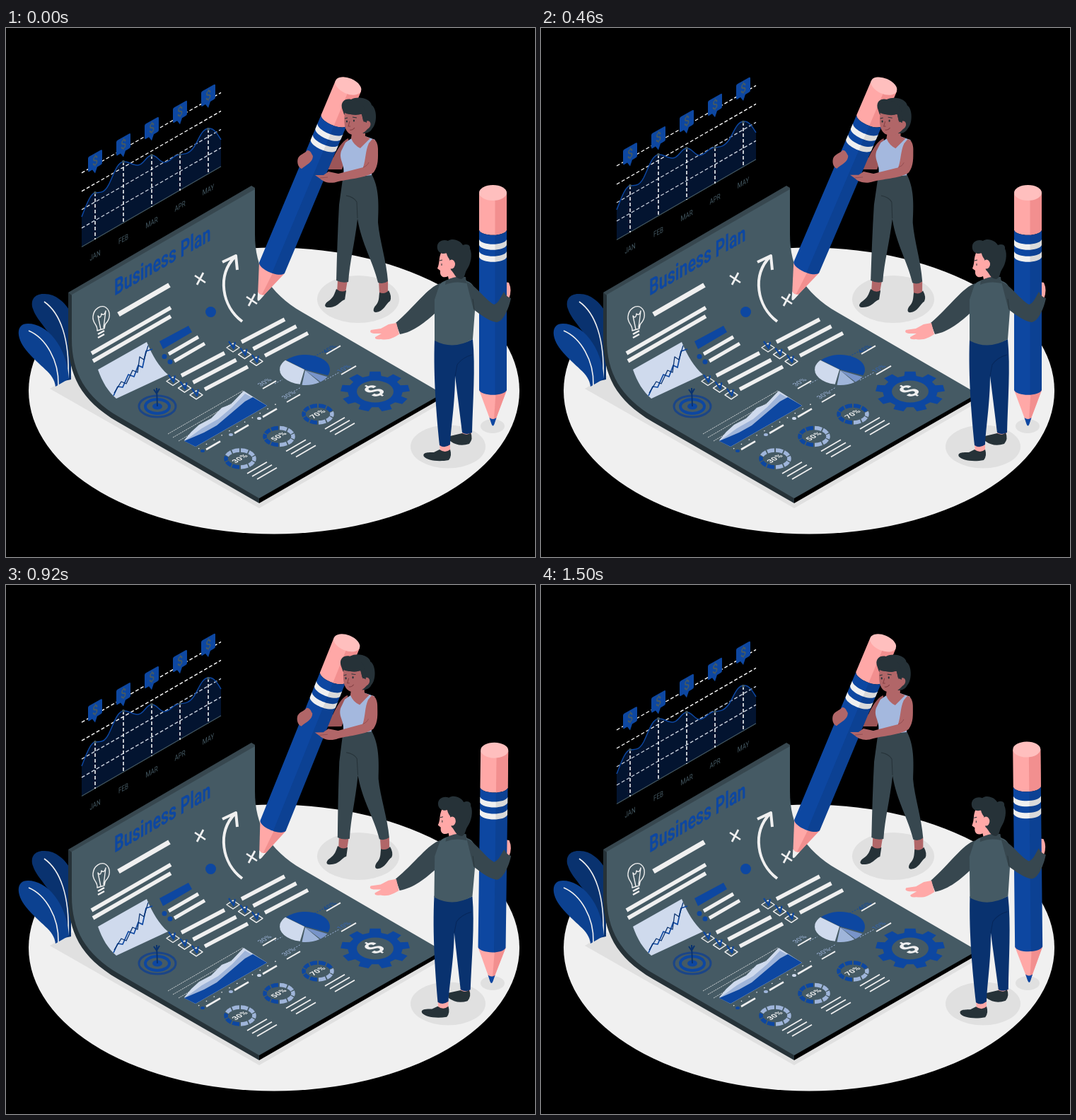
An HTML page with a canvas that plays this animation: 748 by 748 pixels, repeating every 1540 ms.

```html
<!DOCTYPE html>
<html lang="en">
<head>
<meta charset="utf-8">
<title>Business plan</title>
<style>
html, body { margin: 0; width: 100%; height: 100%; overflow: hidden; background: #000; }
canvas { display: block; width: 100vw; height: 100vh; }
</style>
</head>
<body>
<canvas id="stage" width="748" height="748"></canvas>
<script>
const ctx = document.getElementById('stage').getContext('2d');
const LOOP = 1540, SLOPE = 0.577;
const BLUE = '#0d47a1', NAVY = '#09326f', PALE = '#9fb5da', MIST = '#cfdaed',
      PAPER = '#455a64', SLATE = '#37474f', INK = '#263238',
      WHITE = '#f0f0f0', SHADE = '#e0e0e0', PINK = '#ffa8a7', ROSE = '#f28f8f', BROWN = '#b16668';
const WALL = [0.66, -0.381, 0, 1], FLOOR = [0.866, -0.5, 0.8, 0.46];

function fill(color, d) {
  ctx.fillStyle = color;
  ctx.fill(new Path2D(d));
}
function line(color, width, d, dash = []) {
  ctx.strokeStyle = color;
  ctx.lineWidth = width;
  ctx.setLineDash(dash);
  ctx.stroke(new Path2D(d));
  ctx.setLineDash([]);
}
function oval(color, x, y, rx, ry, width) {
  ctx.beginPath();
  ctx.ellipse(x, y, rx, ry, 0, 0, Math.PI * 2);
  ctx.fillStyle = ctx.strokeStyle = color;
  ctx.lineWidth = width || 1;
  width ? ctx.stroke() : ctx.fill();
}
function rising(color, width, x, y, run, dash) {
  line(color, width, `M${x},${y} l${run},${-run * SLOPE}`, dash);
}
function label(text, x, y, font, color, matrix, align = 'center') {
  ctx.save();
  ctx.transform(...matrix, x, y);
  ctx.font = font + ' Roboto, sans-serif';
  ctx.textAlign = align;
  ctx.textBaseline = align === 'left' ? 'alphabetic' : 'middle';
  ctx.fillStyle = color;
  ctx.fillText(text, 0, 0);
  ctx.restore();
}
function turned(x, y, degrees, draw) {
  ctx.save();
  ctx.translate(x, y);
  ctx.rotate(degrees * Math.PI / 180);
  ctx.translate(-x, -y);
  draw();
  ctx.restore();
}
function track(keys, t) {
  const i = keys.findIndex(k => k[0] > t);
  const [t0, a] = keys[i - 1], [t1, b] = keys[i];
  return a + (b - a) * (t - t0) / (t1 - t0);
}

function scenery() {
  oval(WHITE, 379, 513, 347, 202.5);
  oval(SHADE, 498, 383.5, 58, 33.5);
  oval(SHADE, 625, 592, 53, 30.5);
  oval(SHADE, 688, 563, 17, 10);
  fill(SHADE, 'M62,510 L94,491 L160,550 L358,668 L617,517 L618,529 L358,679Z');
  fill(NAVY, 'M92,497 V403 C84,388 70,376 55,376 C40,375 34,385 38,397 C44,416 66,430 74,460 L78,500Z');
  line(WHITE, 1.6, 'M54,387 C77,403 90,440 88,495');
  fill('#0c4190', 'M70,507 C68,487 48,480 28,455 C14,437 14,418 31,418 C58,418 86,450 89,496Z');
  line(WHITE, 1.6, 'M32,428 C56,438 75,470 74,505');
}

function sheet() {
  fill(INK, 'M88,374 L93,376 L160,540 L358,664 V672 L158,557 C105,526 88,490 88,440Z');
  fill('#000', 'M358,664 L617,516 V523 L358,672Z');
  fill(SLATE, 'M88,374 L347,223 L352,226 V236 L93,378Z');
  fill(PAPER, 'M93,377 L352,228 V292 C352,339 371,374 419,402 L617,517 L358,665 L160,550 C112,522 93,487 93,440Z');
}

function upperNotes() {
  label('Business Plan', 153, 379, 'bold 32.5px', BLUE, WALL, 'left');
  line(WHITE, 1.4, 'M129,428 C130,419 122,418 123,408 C124,397 134,391 141,395 C149,401 147,412 141,418 C139,421 140,423 139,425Z M134,426 L130,407 q4,5 5,-3 q4,4 6,-4 L138,424');
  line(WHITE, 2.5, 'M130,433 l9,-5 M130,438 l9,-5');
  rising(WHITE, 7, 159, 405, 72);
  rising(WHITE, 5.5, 121, 460, 112);
  rising(WHITE, 5.5, 123, 471, 110);
  for (const [x, y] of [[274, 355], [347, 385]])
    line(WHITE, 2.7, `M${x - 7},${y - 5} l15,10 M${x + 5},${y - 9} l-9,17`);
  line(WHITE, 4, 'M334,415 C305,393 298,350 324,323 M306,331 L325,322 L327,342');
  oval(BLUE, 289.5, 401.5, 7.5, 7.5);
  fill(MIST, 'M130,483 L199,444 C207,463 216,479 229,490 L156,524 C144,514 136,500 130,483Z');
  line(BLUE, 1.7, 'M152,520 L158,507 L165,508 L173,490 L181,493 L187,477 L193,480 L198,457 L207,454');
  line(NAVY, 1.3, 'M153,516 L163,500 L170,503 L179,484 L186,487 L189,465 L195,469 L201,449');
  fill(BLUE, 'M217,443 L258,421 L263,430 L222,454Z');
  oval(BLUE, 224, 464.5, 3.5, 3.5);
  oval(BLUE, 232, 472, 3.5, 3.5);
  rising(WHITE, 5, 230, 461, 42);
  rising(WHITE, 5, 238, 471, 43);
}

function checklist(x, y) {
  for (let i = 0; i < 3; i++, x += 16.5, y += 9.7) {
    line(WHITE, 5.5, `M${x + 12},${y - 8} l61,-32`);
    line(WHITE, 1.4, `M${x - 9},${y} l9,-6 l9,6 l-9,6Z`);
    line(BLUE, 2.2, `M${x - 6},${y - 9} L${x + 1},${y + 1} l2,-9`);
  }
}

function target() {
  oval('#1b4587', 214, 535, 26, 15, 3);
  oval(BLUE, 214, 535, 17, 10, 4);
  oval(BLUE, 214, 535, 7, 4.5);
  line(NAVY, 2, 'M214,535 L213,509 M209,511 L213,517 L217,510');
}

function areaChart() {
  [[229, 574], [236, 579], [244, 584]].forEach(([x, y]) => rising(WHITE, 0.8, x, y, 106, [2, 1]));
  fill(MIST, 'M252,583 L262,571 L273,561 L290,552 L305,537 L318,532 L336,513 L369,534 L268,592Z');
  fill(PALE, 'M252,584 L262,577 L277,566 L300,553 L320,536 L338,517 L369,534 L268,592Z');
  fill(BLUE, 'M252,584 L280,572 L298,562 L318,545 L338,528 L349,522 L369,534 L268,592Z');
  rising(WHITE, 1.4, 272, 595, 110, [1.5, 11]);
  [BLUE, PALE, MIST].forEach((color, i) => {
    const x = 278 + i * 40, y = 598 - i * 23;
    oval(color, x, y, 3, 2);
    rising(WHITE, 2.6, x + 5, y - 2, 20);
  });
}

function wedge(color, from, to, dx = 0, dy = 0) {
  ctx.beginPath();
  ctx.moveTo(423 + dx, 483 + dy);
  ctx.ellipse(423 + dx, 483 + dy, 35, 21, 0, from, to);
  ctx.closePath();
  ctx.fillStyle = color;
  ctx.fill();
}
function pie() {
  wedge(BLUE, -2.45, 0.4);
  wedge(MIST, 1.75, 3.83, -1, 0);
  wedge('#7894c9', 0.45, 0.9, 0, 1);
  wedge(PALE, 0.95, 1.7, 0, 1);
  line(BLUE, 1, 'M429,468 L448,458 h5', [2, 2]);
  line(PALE, 1, 'M451,498 L471,487 M380,503 L391,497 M407,514 L417,508', [2, 2]);
  label('40%', 458, 454, '10px', BLUE, FLOOR);
  label('10%', 478, 482, '10px', '#3465b5', FLOOR);
  label('30%', 366, 501, '10px', PALE, FLOOR);
  label('30%', 400, 519, '10px', PALE, FLOOR);
  rising(WHITE, 2, 453, 461, 20);
  rising(WHITE, 2, 474, 490, 21);
  rising(WHITE, 2, 363, 510, 19);
  rising(WHITE, 2, 397, 529, 19);
}

function gear() {
  ctx.beginPath();
  const teeth = 9, step = Math.PI * 2 / teeth;
  for (let i = 0; i < teeth; i++) {
    for (const [offset, size] of [[-0.32, 0.79], [-0.22, 1], [0.22, 1], [0.32, 0.79]]) {
      const a = (i + offset) * step - Math.PI / 2;
      ctx.lineTo(522 + Math.cos(a) * 49 * size, 514 + Math.sin(a) * 28.5 * size);
    }
  }
  ctx.fillStyle = BLUE;
  ctx.fill();
  oval(PAPER, 522, 514, 26, 15.5);
  label('$', 522, 514, 'bold 34px', WHITE, FLOOR);
}

function gauge(x, y, percent) {
  for (let i = 0; i < 10; i++) {
    const a = Math.PI / 2 + i * Math.PI / 5;
    ctx.beginPath();
    ctx.ellipse(x, y, 20, 12, 0, a + 0.05, a + Math.PI / 5 - 0.05);
    ctx.lineWidth = 5.5;
    ctx.strokeStyle = i < percent / 10 ? BLUE : PALE;
    ctx.stroke();
  }
  label(percent + '%', x, y, 'bold 11px', WHITE, FLOOR);
  for (let i = 0; i < 3; i++) rising(WHITE, 1.8, x + 10 + i * 7, y + 21 + i * 4, 28);
}

function floatingChart() {
  const hill = 'M107,267 C113,252 119,234 126,233 C133,232 138,235 145,222 C152,208 157,190 166,189 C173,188 178,194 186,194 C195,194 198,180 206,180 C214,180 217,190 224,190 C232,190 236,180 245,179 C254,178 259,178 266,168 C273,157 277,142 287,142 C294,142 298,148 304,158';
  fill('#031430', hill + ' V196 L107,309Z');
  for (let i = 0; i < 4; i++) rising(i < 2 ? '#fff' : '#ccd3df', 1.4, 107, 205 + i * 26, 197, [5, 3]);
  rising(PAPER, 1.2, 107, 309.5, 197);
  line(BLUE, 1.5, hill);
  const months = ['JAN', 'FEB', 'MAR', 'APR', 'MAY'], peaks = [233, 189, 180, 179, 143];
  months.forEach((month, i) => {
    const x = 126 + i * 40, y = 188.5 - i * 23.1;
    line('#fff', 1.5, `M${x},${peaks[i]} V${299 - i * 23}`, [5, 3]);
    oval(PAPER, x, peaks[i], 2, 2);
    label(month, x, 322 - i * 23.2, '11px', PAPER, [0.72, -0.41, 0, 1]);
    fill(BLUE, `M${x - 10},${y - 4} q0,-2 2,-3 l16,-9 q2,-1 2,1 v17 q0,2 -2,3 l-5,3 l-3,9 l-4,-5 l-5,3 q-1,0 -1,-2Z`);
    label('$', x, y, '500 18px', PAPER, [0.8, -0.42, 0, 1]);
  });
}

// A pencil hanging down from its cap, tilted by an angle in degrees.
function pencil(x, y, tilt, lead) {
  const band = (top, bottom, color) => fill(color,
    `M-19.5,${top} C-16,${top + 9} 16,${top + 9} 19.5,${top} V${bottom} C16,${bottom + 9} -16,${bottom + 9} -19.5,${bottom}Z`);
  ctx.save();
  ctx.translate(x, y);
  ctx.rotate(tilt * Math.PI / 180);
  fill(PINK, 'M-19.5,279 L-2,326 Q0,331 2,326 L19.5,279Z');
  fill(ROSE, 'M4,283 L1,328 L19.5,279Z');
  fill(lead, 'M-5,318 Q0,322 5,318 L2,327 Q0,332 -2,327Z');
  band(0, 53, PINK);
  fill(ROSE, 'M3,0 H19.5 V53 Q14,58 3,60Z');
  band(53, 279, BLUE);
  band(66, 74, WHITE);
  band(83, 91, WHITE);
  fill('rgba(0,0,0,.09)', 'M3,60 Q14,58 19.5,53 V279 Q14,285 3,286Z');
  oval('#ffbfbe', 0, 0, 19.5, 11);
  ctx.restore();
}

function woman() {
  fill('#9c5558', 'M484,156 C475,160 469,171 463,183 L430,190 L432,200 L475,200 L486,170Z');
  pencil(484, 82, 22.8, WHITE);
  fill(BROWN, 'M413,184 C416,178 422,178 426,173 C431,173 432,178 434,181 C434,190 425,193 418,199 C413,197 411,190 413,184Z');
  fill(BROWN, 'M469,356 H483 L480,374 H468Z M527,358 H540 V376 L528,377Z');
  fill(INK, 'M467,369 Q474,375 481,371 L479,384 C472,386 469,396 454,395 C449,394 451,389 456,386 C463,381 464,377 467,369Z');
  fill(INK, 'M528,374 Q536,377 541,371 Q546,380 543,386 C537,390 534,401 523,402 C518,402 519,396 523,392 C528,386 527,380 528,374Z');
  fill(SLATE, 'M477,207 L516,205 C528,225 527,250 526,275 C528,300 538,330 540,358 Q533,363 526,360 C519,330 503,306 497,270 C493,305 486,330 484,359 Q475,361 467,357 C468,320 469,285 471,250Z');
  line(INK, 1, 'M481,237 Q492,239 496,246 L497,269');
  fill('#a4b8de', 'M480,162 L490,155 L508,153 L522,158 L517,208 Q495,211 477,208 C480,192 470,187 474,174Z');
  fill(BROWN, 'M490,143 L508,140 V153 L515,156 L501,170 Q492,166 488,156Z');
  fill(INK, 'M475,113 C473,103 481,99 488,101 C500,95 516,101 517,109 C525,114 525,135 518,142 C515,148 509,149 505,149 L478,122Z');
  fill(BROWN, 'M479,120 C486,124 496,121 503,122 L506,133 C516,127 519,139 511,143 C508,147 499,154 490,151 C480,149 477,138 479,120Z');
  fill(INK, 'M475,109 C478,124 497,125 503,121 L505,131 L510,134 C513,120 506,105 492,102Z');
  oval(INK, 482, 132, 1.1, 1.6);
  oval(INK, 492, 131, 1.1, 1.6);
  line(INK, 1, 'M479,128 l4,-1 M490,126 l6,1');
  line('#843f43', 1, 'M486,132 l-2,7 l3,0 M486,144 q4,1 7,-3');
  fill(BROWN, 'M518,157 C523,157 526,164 526,171 C526,184 527,194 520,204 C509,212 487,213 470,217 C459,221 449,218 444,213 L437,208 L449,208 L456,203 L470,206 L505,197 C509,185 508,174 513,163Z');
  line('#8d484c', 0.8, 'M505,197 Q511,195 513,190 M444,212 L455,211');
}

function man() {
  fill(PINK, 'M701,364 Q704,358 711,360 Q716,371 711,383 L700,386Z');
  pencil(688.5, 233, 0, BLUE);
  fill(PINK, 'M613,586 H628 V602 H614Z M645,570 H658 V579 H645Z');
  fill(INK, 'M628,577 L645,573 Q653,577 657,572 Q661,581 655,588 Q640,593 628,584Z');
  fill(INK, 'M613,596 Q621,602 628,596 Q631,605 626,611 C610,614 595,611 591,606 C588,600 597,600 605,600Z');
  fill(NAVY, 'M606,440 Q632,454 660,440 C664,480 660,530 659,572 Q651,576 645,572 L635,492 C635,530 629,565 628,589 Q620,595 613,590 C609,550 604,495 606,440Z');
  line('#07275a', 1, 'M635,492 L638,476 Q645,466 659,462');
  fill(SLATE, 'M614,361 C597,366 578,394 551,417 L557,433 C576,430 594,415 608,402Z');
  fill(PINK, 'M552,417 L541,419 L530,425 L516,427 Q513,431 520,432 L531,432 L522,437 Q521,441 530,440 C541,442 548,438 556,433Z');
  fill(PAPER, 'M613,363 C617,355 646,350 652,358 C665,361 667,382 663,400 L660,440 Q632,456 606,442 V384Z');
  fill(PINK, 'M616,316 C611,326 614,331 610,340 L614,343 C613,352 619,354 625,351 L627,360 Q638,360 642,352 L641,325Z');
  fill(SLATE, 'M622,357 Q636,350 650,352 L651,361 Q635,357 621,363Z');
  fill(INK, 'M610,312 C608,302 618,298 625,301 C632,296 643,301 646,307 C653,304 657,308 656,312 C660,320 657,334 652,341 C648,347 650,352 644,355 C635,355 634,346 629,342 L627,327 C624,323 623,320 623,318 C617,321 611,317 610,312Z');
  oval(PINK, 630, 334, 5, 6.5);
  line(INK, 1, 'M613,329 l4,-1 M616,333 v3');
  fill(SLATE, 'M651,359 C665,364 676,383 690,391 C697,389 700,379 704,373 Q708,381 714,382 C711,397 703,415 694,416 C683,415 671,405 661,398Z');
  line(INK, 0.8, 'M662,398 L660,383');
}

function draw(t) {
  ctx.clearRect(0, 0, 748, 748);
  ctx.lineJoin = 'round';
  scenery();
  sheet();
  upperNotes();
  checklist(236, 499.5);
  checklist(321, 452);
  target();
  areaChart();
  pie();
  gear();
  gauge(331, 609, 30);
  gauge(386, 577.5, 50);
  gauge(441, 546, 70);

  const lift = track([[0, 0], [170, -4], [460, -10], [630, -13], [740, -13.2], [920, -11], [1080, -7.7], [1500, 0], [LOOP, 0]], t);
  ctx.save();
  ctx.translate(0, lift);
  floatingChart();
  ctx.restore();

  turned(470, 230, -0.25 + 0.75 * Math.sin(t / LOOP * Math.PI * 2 + 0.3), woman);
  const lean = track([[0, 0], [460, 0], [630, 0.3], [900, 0.8], [1080, 0.35], [1500, -0.6], [LOOP, -0.6]], t);
  turned(640, 400, lean, man);
}

function frame() {
  draw(performance.now() % LOOP);
  requestAnimationFrame(frame);
}
frame();
</script>
</body>
</html>
```
